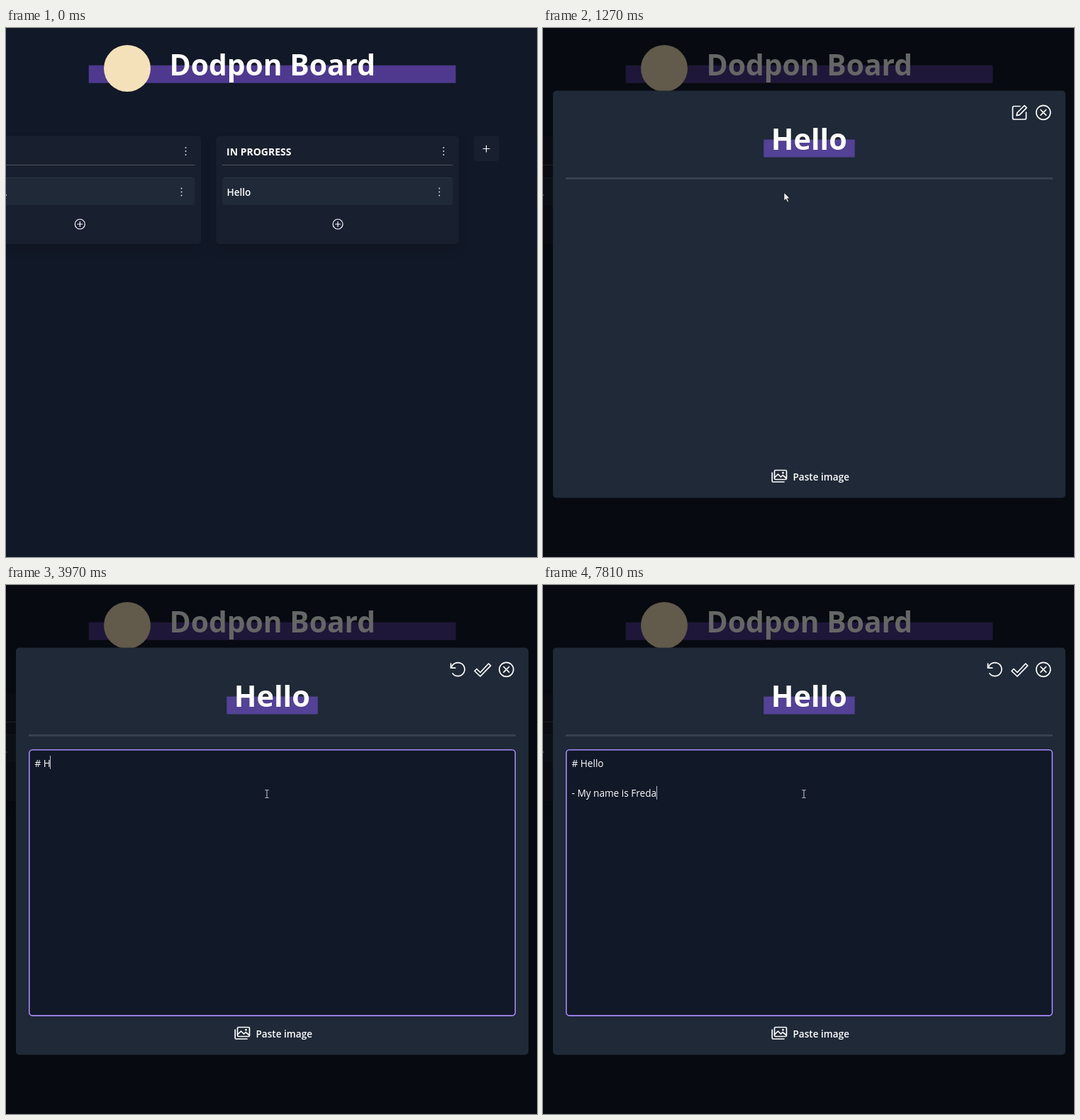
Animation, 749 px wide and 747 px high, one loop 8000 ms. Source, as an HTML page:

```html
<!DOCTYPE html>
<html lang="en">
<head>
<meta charset="utf-8">
<title>Task board</title>
<style>
  html, body { margin: 0; width: 100%; height: 100%; overflow: hidden; background: #111827; }
  svg { display: block; width: 749px; height: 747px; }
  text { font-family: "Open Sans", "Noto Sans", sans-serif; font-size: 13.6px; fill: #fff; white-space: pre; }
  .title { font-size: 40.8px; font-weight: 700; }
  .heading { font-size: 14px; font-weight: 700; }
  .semi { font-weight: 600; }
  .column { fill: #181f2e; filter: drop-shadow(0 8px 7px rgba(0, 0, 0, .1)); }
  .card { fill: #1f2937; }
  .edge { stroke: #2d3a46; }
  .rule { stroke: #52525b; }
  .icon { fill: none; stroke: #fff; stroke-width: 1.7; stroke-linecap: round; stroke-linejoin: round; }
  .thin { stroke-width: 1.2; }
</style>
</head>
<body>
<svg viewBox="0 0 749 747">
  <defs>
    <g id="dots" fill="#e5e7eb">
      <circle cy="-5" r=".95"/><circle r=".95"/><circle cy="5" r=".95"/>
    </g>
    <g id="add" class="icon thin">
      <circle r="7"/><path d="M-3.5 0h7M0-3.5v7"/>
    </g>
    <!-- one board column, origin at its top left corner -->
    <g id="column">
      <rect class="column" width="342.5" height="152.5" rx="5"/>
      <path class="rule" d="M8.5 41H334"/>
      <rect class="card" x="8.5" y="58.5" width="325.5" height="39" rx="4"/>
      <path class="edge" d="M12 59H330.5"/>
      <use href="#dots" x="321" y="21.5"/>
      <use href="#dots" x="315" y="79"/>
      <use href="#add" x="171.8" y="124.5"/>
    </g>
  </defs>

  <rect width="749" height="747" fill="#111827"/>
  <rect x="116.7" y="52.7" width="517.7" height="25" fill="#4f398f"/>
  <circle cx="171" cy="57" r="33" fill="#f5e1b9"/>
  <text class="title" x="230.5" y="67">Dodpon Board</text>

  <use href="#column" x="-67.5" y="152.5"/>
  <text class="semi" x="-2" y="236.5">.</text>
  <use href="#column" x="296.3" y="152.5"/>
  <text class="heading" x="311" y="179.5">IN PROGRESS</text>
  <text class="semi" x="311.5" y="236.5">Hello</text>
  <rect x="660" y="152.5" width="35.5" height="35.5" rx="4" fill="#181f2e"/>
  <path class="icon thin" d="M673 170.5h9M677.5 166v9"/>

  <g id="modal" opacity="0">
    <rect width="749" height="747" fill="#000" opacity=".6"/>
    <rect x="14" y="88.5" width="723" height="575" rx="5" fill="#1f2937"/>
    <rect x="311.3" y="157.5" width="128.5" height="25" fill="#534295"/>
    <text class="title" x="321.7" y="172" style="font-size:41.5px">Hello</text>
    <rect x="32" y="211" width="687" height="2.7" fill="#3a4350"/>

    <g class="icon">
      <circle cx="705.8" cy="119.3" r="10"/>
      <path d="M702 115.5l7.6 7.6M709.6 115.5l-7.6 7.6"/>
      <path id="edit" d="M673 110.5H664.5a2 2 0 0 0-2 2V127a2 2 0 0 0 2 2H679.5a2 2 0 0 0 2-2V119M669 119.5L679 109.5l3.2 3.2L672.2 122.7L668 123.7Z"/>
      <g id="editIcons">
        <path d="M661 121.5l3-3 5 5L680.7 111l3 2.8L669 129Z"/>
        <path d="M627.5 111v6.2h6.2M628.2 117A9.5 9.5 0 1 1 630 125"/>
      </g>
      <path d="M327.5 624.5H342a1.5 1.5 0 0 1 1.5 1.5V636a1.5 1.5 0 0 1-1.5 1.5H328a1.5 1.5 0 0 1-1.5-1.5V626a1.5 1.5 0 0 1 1.5-1.5M323.2 628V639.5a1.5 1.5 0 0 0 1.5 1.5H340M327 634.5l4.5-4.5 4 4 2.5-2.5 5 4"/>
      <circle cx="338.5" cy="628.3" r=".6"/>
    </g>
    <text class="semi" x="352.5" y="638.5">Paste image</text>

    <g id="editor">
      <rect x="32.8" y="232.8" width="685.5" height="375.3" rx="4.5" fill="#111827" stroke="#a78bfa" stroke-width="1.6"/>
      <g id="lines"></g>
      <rect id="caret" width="1" height="19" fill="#b9bdc8"/>
    </g>
  </g>

  <path id="arrow" d="M0 0V11.3L2.7 8.9 4.6 13.2 6.5 12.4 4.6 8.2H8.2Z" fill="#fff" stroke="#111" stroke-width=".7"/>
  <path id="beam" d="M-2.5-5.5H-.8L0-5 .8-5.5H2.5M0-5V5M-2.5 5.5H-.8L0 5 .8 5.5H2.5" fill="none" stroke="#c9ccd3"/>
</svg>

<script>
const LOOP = 8000, FRAME = 67, BLINK = 530;
const OPEN = 1130, EDIT = 2250;
const LEFT = 40.5, TOP = 241, LINE = 21.4;

const message = "# Hello\n\n- My name is Freda";
const keyTimes = [
  3310, 3500, 3970, 4100, 4300, 4440, 4570, 4760, 5430,
  5630, 5760, 6090, 6220, 6360, 6430, 6560, 6620, 6750, 6820,
  7020, 7090, 7220, 7280, 7420, 7550, 7680, 7810
];

const easeOut = u => 1 - (1 - u) ** 2;
const smooth = u => u * u * (3 - 2 * u);
const moves = [
  { start: 390, lead: 0, steps: 10, from: [668, 688], to: [340, 232.5], ease: easeOut },
  { start: 1530, lead: 1, steps: 9, from: [340, 232.5], to: [676, 118], ease: smooth },
  { start: 2380, lead: 1, steps: 6, from: [676, 118], to: [368, 295], ease: smooth }
];

const $ = id => document.getElementById(id);
const show = (el, on) => el.setAttribute("visibility", on ? "inherit" : "hidden");
const pen = document.createElement("canvas").getContext("2d");
pen.font = '13.6px "Open Sans", "Noto Sans", sans-serif';

const rows = message.split("\n").map((_, i) => {
  const row = document.createElementNS("http://www.w3.org/2000/svg", "text");
  row.setAttribute("x", LEFT);
  row.setAttribute("y", TOP + 15.5 + i * LINE);
  return $("lines").appendChild(row);
});

function pointer(t) {
  const move = moves.filter(m => t >= m.start).pop();
  if (!move) return null;
  const step = Math.floor((t - move.start) / FRAME) + move.lead;
  const u = move.ease(Math.min(1, step / move.steps));
  return move.from.map((a, i) => a + (move.to[i] - a) * u);
}

function drawPointer(t) {
  const at = pointer(t);
  const inField = !!at && t >= EDIT && at[1] > 232;
  show($("arrow"), at && !inField);
  show($("beam"), inField);
  if (at) $(inField ? "beam" : "arrow").setAttribute("transform", `translate(${at})`);
}

function drawEditor(t) {
  const editing = t >= EDIT;
  show($("edit"), !editing);
  show($("editIcons"), editing);
  show($("editor"), editing);

  const count = keyTimes.filter(k => k <= t).length;
  const typed = message.slice(0, count).split("\n");
  rows.forEach((row, i) => { row.textContent = typed[i] || ""; });

  const last = typed.length - 1;
  const lastKey = count ? keyTimes[count - 1] : EDIT;
  $("caret").setAttribute("x", Math.round(LEFT - .5 + pen.measureText(typed[last]).width));
  $("caret").setAttribute("y", Math.round(TOP + last * LINE));
  show($("caret"), editing && Math.floor((t - lastKey) / BLINK) % 2 === 0);
}

function draw(t) {
  const opacity = t < OPEN ? 0 : t < 1200 ? .015 : t < 1270 ? .55 : 1;
  $("modal").setAttribute("opacity", opacity);
  drawEditor(t);
  drawPointer(t);
}

const begin = performance.now();
function tick() {
  draw((performance.now() - begin) % LOOP);
  requestAnimationFrame(tick);
}
tick();
</script>
</body>
</html>
```
